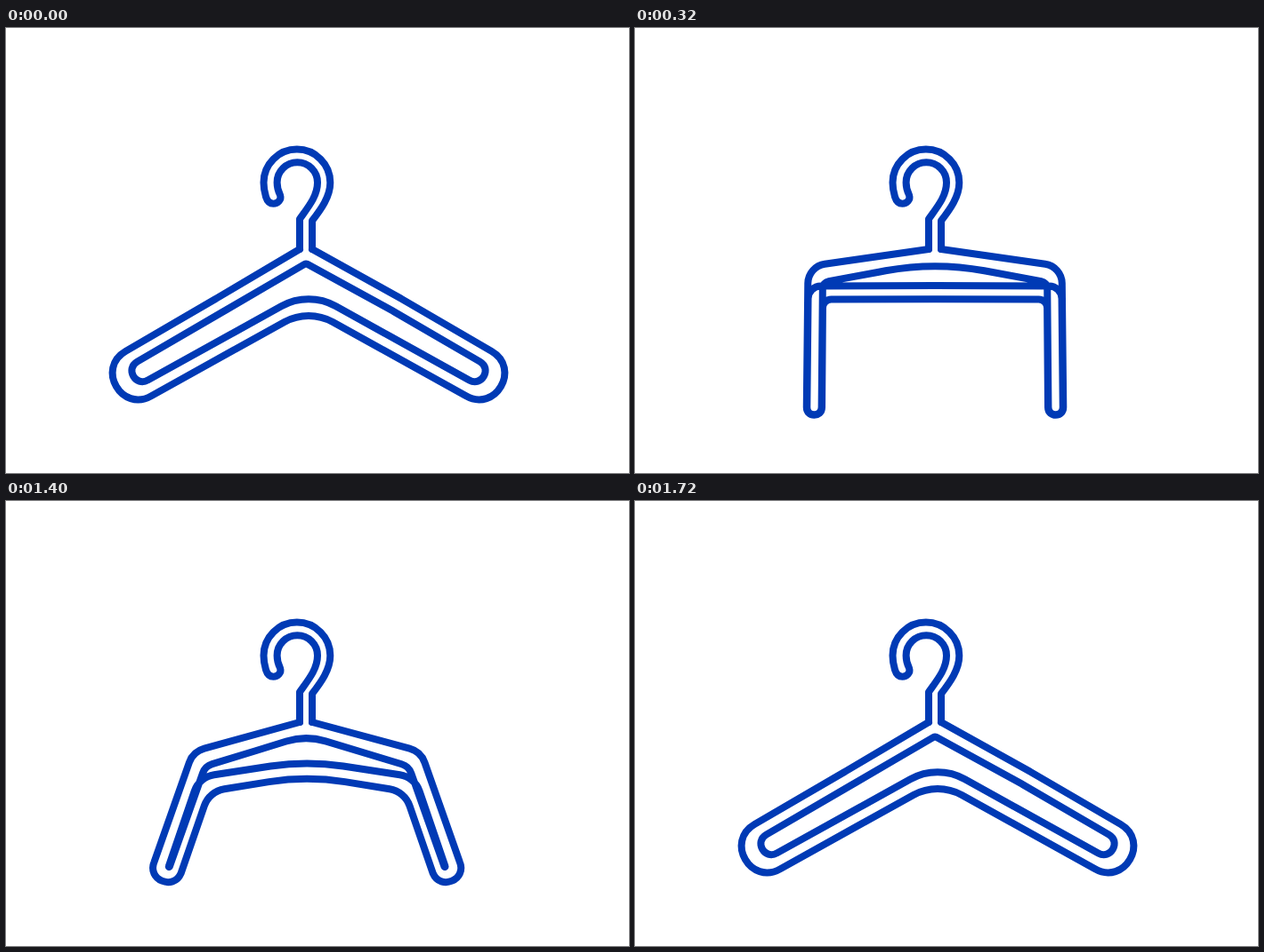
Recreate the animation shown at these times as an HTML page with a canvas. Size 700 by 501 pixels, loop 2.4 s.

```html
<!DOCTYPE html>
<html lang="en">
<head>
<meta charset="utf-8">
<title>Folding hanger</title>
<style>
  html, body { margin: 0; width: 100%; height: 100%; overflow: hidden; background: #fff; }
  canvas { display: block; }
</style>
</head>
<body>
<canvas id="stage" width="700" height="501"></canvas>
<script>
const ctx = document.getElementById('stage').getContext('2d');
const LOOP = 2400, STEP = 40;
const OPEN_AXIS = 340, FOLDED_AXIS = 337;

const hook = new Path2D(
  'M330 249V215C340 201 350 189 350 174A22.7 22.7 0 0 0 304.6 174' +
  'C304.6 180 306 184 308 188C310 194 305 197.7 300.5 197.7' +
  'C296 197.7 293.5 195 292 190C290.5 185 289.5 180 289.5 174' +
  'A37.4 37.4 0 0 1 364.3 174C364.3 190 354 204 344 217V249');

// Left half of each outline as [x, y, radius], open and folded.
// A negative tip radius means that the two sides of the leg have crossed.
const outer = {
  open: { corner: [236, 304.7, 30], tip: [149, 389, 29], elbow: [257, 362, 60], arch: [OPEN_AXIS, 316, 56] },
  folded: { corner: [194, 268, 22], tip: [202, 427.5, 8.4], elbow: [210.5, 305, 9], arch: [FOLDED_AXIS, 305, 400] }
};
const inner = {
  open: { corner: [245, 318.8, 30], tip: [153.5, 386, 12], elbow: [254, 344, 50], arch: [OPEN_AXIS, 296, 63] },
  folded: { corner: [210.5, 286, 8], tip: [202, 427.5, -8.4], elbow: [194, 290, 14], arch: [FOLDED_AXIS, 290, 400] }
};

const mix = (a, b, k) => a + (b - a) * k;
const mixPoints = (a, b, k) => a.map((value, i) => mix(value, b[i], k));
const easeOut = (x, power) => 1 - (1 - Math.min(Math.max(x, 0), 1)) ** power;

// 0 is open, 1 is folded.
const foldAt = time => time < 1240
  ? easeOut(time / 520, 4.7)
  : 1 - easeOut((time - 1240) / 480, 1.2);

const line = p => ctx.lineTo(...p);
const round = (p, next, radius) => ctx.arcTo(p[0], p[1], next[0], next[1], radius);
const curve = (a, b, end) => ctx.bezierCurveTo(...a, ...b, ...end);

function outlineAt({ open, folded }, fold) {
  const outline = {};
  for (const name in open) outline[name] = mixPoints(open[name], folded[name], fold);
  return outline;
}

function traceArms(start, end, { corner, tip, elbow, arch }, fold) {
  const angle = mix(Math.PI / 3, 0, fold);
  const sin = Math.sin(angle), cos = Math.cos(angle);
  const [tipX, tipY, tipR] = tip;
  const flip = ([x, y]) => [2 * arch[0] - x, y];
  const capPoint = (side, reach) => {
    const across = tipR * side, along = Math.abs(tipR) * reach;
    return [tipX - cos * across - sin * along, tipY - sin * across + cos * along];
  };
  const cap = [capPoint(1, 0), capPoint(1, 4 / 3), capPoint(-1, 4 / 3), capPoint(-1, 0)];
  const [a, b, c, d] = cap.map(flip);

  ctx.moveTo(...start);
  round(corner, cap[0], corner[2]);
  line(cap[0]);
  curve(cap[1], cap[2], cap[3]);
  round(elbow, arch, elbow[2]);
  round(arch, flip(elbow), arch[2]);
  round(flip(elbow), d, elbow[2]);
  line(d);
  curve(c, b, a);
  round(flip(corner), end, corner[2]);
}

function draw(time) {
  const fold = foldAt(time);
  ctx.fillStyle = '#fff';
  ctx.fillRect(0, 0, 700, 501);
  ctx.strokeStyle = '#003ab5';
  ctx.lineWidth = 8;
  ctx.lineCap = ctx.lineJoin = 'round';
  ctx.stroke(hook);

  ctx.beginPath();
  traceArms([330, 249], [344, 249], outlineAt(outer, fold), fold);
  line([344, 249]);

  const loop = outlineAt(inner, fold);
  const peak = [337, mix(265, 263, fold)];
  const start = mixPoints(peak, loop.corner, 0.5);
  traceArms(start, peak, loop, fold);
  round(peak, start, mix(3, 315, fold ** 3));
  ctx.closePath();
  ctx.stroke();
}

function tick() {
  draw(Math.floor(performance.now() % LOOP / STEP) * STEP);
  requestAnimationFrame(tick);
}
tick();
</script>
</body>
</html>
```
